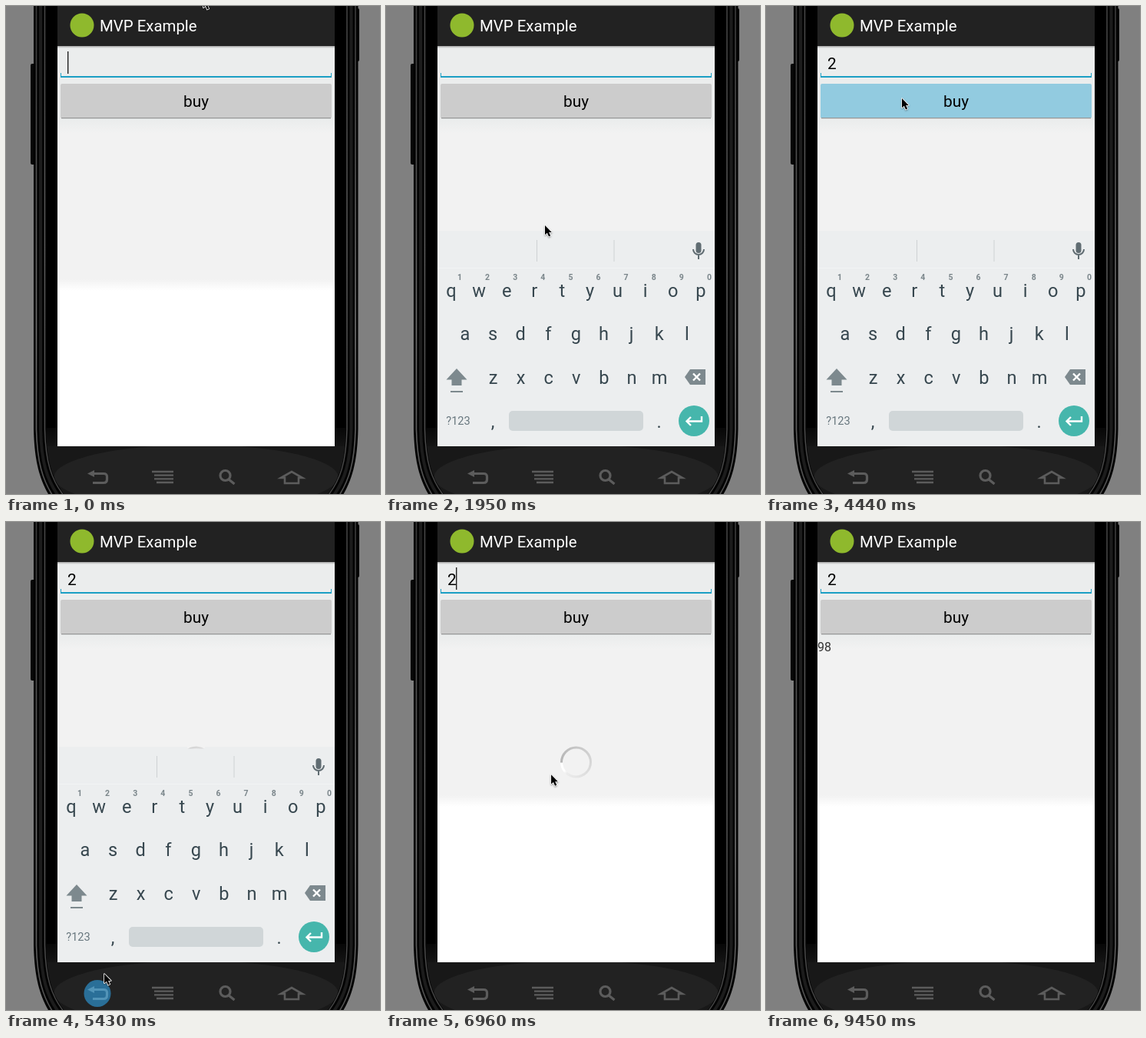
Animation, 487 px wide and 634 px high, one loop 9480 ms. Source, as an HTML page with a canvas:

```html
<!DOCTYPE html>
<html lang="en">
<head>
<meta charset="utf-8">
<title>MVP Example</title>
<style>
html, body { margin: 0; width: 100%; height: 100%; overflow: hidden; background: #808080; }
canvas { display: block; }
</style>
</head>
<body>
<canvas id="stage" width="487" height="634"></canvas>
<script>
const ctx = document.getElementById('stage').getContext('2d');
const LOOP = 9480, TICK = 30;
const TYPED = 3660, BUY = 4350, SPIN = 4470, DONE = 7440;
const INK = '#37474f', ICON = '#7d898e', NAV = '#5c5c5c';
const ARROW = 'M0 0V12.300L2.900 9.700L5 14.600L7.200 13.600L5.100 8.900H8.800Z';

// Pointer tip: time, x, y
const route = [
  [0, 257, -10], [150, 257, -10], [360, 269, 30], [510, 255, 82], [660, 220, 102],
  [870, 200, 82], [1140, 200, 82], [1320, 179, 80], [1500, 179, 80], [1950, 207, 285],
  [2310, 150, 326], [2460, 130, 340], [2640, 118, 342], [3330, 118, 342],
  [3510, 118, 304], [3650, 118, 304], [3900, 150, 190], [4230, 177, 120],
  [4470, 177, 120], [5160, 116, 609], [5280, 116, 609], [5430, 128, 587],
  [5850, 240, 345], [6150, 270, 307], [6270, 262, 310], [6750, 230, 335],
  [7200, 205, 320], [7740, 205, 320], [8190, 80, 166], [8610, 80, 166],
  [8850, 190, 100], [9030, 339, 25], [9180, 335, -22], [LOOP, 335, -22]
];

const clamp = v => Math.max(0, Math.min(1, v));
const ease = v => (v = clamp(v), v * v * (3 - 2 * v));
const within = (t, a, b) => t >= a && t < b;

function pointerAt(t) {
  let i = 0;
  while (i < route.length - 2 && t >= route[i + 1][0]) i++;
  const a = route[i], b = route[i + 1], span = b[0] - a[0], u = (t - a[0]) / span;
  const slope = (k, d) => {
    const p = route[k - 1], q = route[k], r = route[k + 1];
    if (!p || !r || (q[d] - p[d]) * (r[d] - q[d]) <= 0) return 0;
    return (r[d] - p[d]) / (r[0] - p[0]);
  };
  return [1, 2].map(d => {
    const s = ease(u);
    return a[d] + (b[d] - a[d]) * s
      + span * (u * (1 - u) ** 2 * slope(i, d) - u * u * (1 - u) * slope(i + 1, d));
  });
}

function rect(x, y, w, h, fill, r = 0) {
  ctx.fillStyle = fill;
  ctx.beginPath();
  ctx.roundRect(x, y, w, h, r);
  ctx.fill();
}

function disc(x, y, r, fill) {
  ctx.fillStyle = fill;
  ctx.beginPath();
  ctx.arc(x, y, r, 0, 7);
  ctx.fill();
}

function text(s, x, y, size, fill, align = 'center', weight = 400) {
  ctx.font = `${weight} ${size}px Roboto, sans-serif`;
  ctx.textAlign = align;
  ctx.fillStyle = fill;
  ctx.fillText(s, x, y);
}

function fade(y0, y1, ...colors) {
  const g = ctx.createLinearGradient(0, y0, 0, y1);
  colors.forEach((c, i) => g.addColorStop(i / (colors.length - 1), c));
  return g;
}

function shape(d, fill, stroke, width = 2) {
  const p = new Path2D(d);
  if (fill) { ctx.fillStyle = fill; ctx.fill(p); }
  if (stroke) { ctx.strokeStyle = stroke; ctx.lineWidth = width; ctx.stroke(p); }
}

function icon(x, y, ...args) {
  ctx.save();
  ctx.translate(x, y);
  shape(...args);
  ctx.restore();
}

function shell(inset) {
  const l = 36 + inset, r = 458.5 - inset, k = inset * 0.4;
  return `M${l} -5V550C${l + 1} 590 ${l + 7} 617 ${l + 24 + k} 642`
    + `H${r - 24 - k}C${r - 7} 617 ${r - 1} 590 ${r} 550V-5Z`;
}

function phone(t) {
  rect(0, 0, 487, 634, '#808080');
  rect(32, 75, 7, 131, '#070707', 2);
  rect(455, 3, 5, 69, '#070707', 2);
  shape(shell(0), '#030303');
  shape(shell(3.5), null, fade(0, 634, '#3a3a3a', '#505050', '#707070', '#505050'), 1.6);
  shape(shell(9), null, '#1c1c1c', 4);
  shape(shell(14.5), null, fade(0, 634, '#484848', '#606060', '#484848'), 1.4);
  ctx.save();
  ctx.clip(new Path2D(shell(16)));
  rect(50, 0, 396, 548, '#000');
  rect(50, 548, 396, 24, fade(548, 572, '#070707', '#141414'));
  rect(50, 572, 396, 62, '#181818');
  ctx.fillStyle = '#222';
  ctx.beginPath();
  ctx.ellipse(247.5, 612, 185, 42, 0, 0, 7);
  ctx.fill();
  ctx.restore();

  const pressed = within(t, 5220, 5460);
  if (pressed) disc(119, 612.5, 17.5, '#2a6f98');
  const back = pressed ? '#5294b8' : NAV;
  icon(118, 612, 'M-5 -4.500H9Q13.500 -4.500 13.500 -0.500V3Q13.500 7.500 9 7.500H-5', null, back, 3.2);
  icon(118, 612, 'M-12 -4.500L-3 -9V0Z', back);
  icon(204, 612, 'M-14 -7H14M-11 -2.300H14M-11 2.300H14M-8 7H14', null, NAV, 2.3);
  icon(286.5, 612, 'M5.500 -2A6.500 6.500 0 1 1 -7.500 -2A6.500 6.500 0 1 1 5.500 -2M3.500 3L11 9', null, NAV, 3.2);
  icon(372, 612, 'M-14 1L0 -7L14 1H9V8H-9V1Z', null, NAV, 2.6);
}

function spinner(t) {
  const g = ctx.createConicGradient(-1.1 + (t - 6150) / 1200 * Math.PI * 2, 247.5, 312);
  g.addColorStop(0, '#b4b4b4');
  g.addColorStop(0.3, '#cacaca');
  g.addColorStop(0.86, '#ececec');
  g.addColorStop(0.9, '#fff');
  g.addColorStop(0.99, '#fff');
  g.addColorStop(1, '#b4b4b4');
  ctx.strokeStyle = g;
  ctx.lineWidth = 3;
  ctx.beginPath();
  ctx.arc(247.5, 312, 19, 0, 7);
  ctx.stroke();
}

function app(t) {
  rect(67, 0, 361, 572, '#fff');
  rect(67, 52, 361, 98, '#ebeded');
  rect(67, 150, 361, 15, fade(150, 165, '#ebeded', '#f2f2f2'));
  rect(67, 165, 361, 190, '#f2f2f2');
  rect(67, 355, 361, 15, fade(355, 370, '#f2f2f2', '#fff'));
  rect(67, 0, 361, 52, '#222');
  rect(67, 52, 361, 3, fade(52, 55, '#a8a8a8', '#ebeded'));
  disc(99, 25, 15.5, '#8fb92d');
  text('MVP Example', 122, 33, 20.4, '#fff', 'left');

  rect(71, 91, 353, 2, '#1b9fc4');
  rect(71, 87, 1, 5, '#1b9fc4');
  rect(423, 87, 1, 5, '#1b9fc4');
  const typed = t >= TYPED;
  if (typed) text('2', 80, 82, 20.8, '#000', 'left');
  const caretOn = typed ? Math.floor((9449 - t) / 525) % 2 === 0 && t < 9449
                        : Math.floor(t / 520) % 2 === 0;
  if (caretOn) rect(typed ? 91 : 80, 59, 1.4, 29, '#222');

  rect(71, 101, 353, 45, within(t, BUY, SPIN) ? '#92cbe0' : '#ccc', 2);
  rect(72, 145, 351, 1.3, '#969696');
  text('buy', 247.5, 131, 20.8, '#000');

  if (within(t, SPIN, DONE)) spinner(t);
  if (t >= DONE) text('98', 67, 168, 16, '#333', 'left');
}

function keyRow(keys, x, y) {
  [...keys].forEach((k, i) => text(k, x + i * 36.1, y, 23.6, INK));
}

function keyboard(t) {
  const shown = ease((t - 1560) / 210) * (1 - ease((t - 5460) / 180));
  if (!shown) return;
  ctx.save();
  ctx.beginPath();
  ctx.rect(67, 250, 361, 322);
  ctx.clip();
  ctx.globalAlpha = shown;
  ctx.translate(0, (1 - shown) * 56);
  // A sliver of the spinner stays visible above the strip
  const top = within(t, SPIN, 5460) ? 294.5 : 292;
  rect(67, 292, 169, 280, '#eceeef');
  rect(259, 292, 169, 280, '#eceeef');
  rect(236, top, 23, 572 - top, '#eceeef');
  rect(67, 340, 361, 1, '#f2f4f4');
  rect(196, 304, 1, 28, '#cdd1d3');
  rect(296.5, 304, 1, 28, '#cdd1d3');

  if (within(t, 2880, 3150)) rect(104, 342, 36, 57, '#d3d8da', 2);
  keyRow('qwertyuiop', 85, 378);
  [...'1234567890'].forEach((n, i) => text(n, 96 + i * 36.1, 356, 10.5, '#7b868b', 'center', 700));
  keyRow('asdfghjkl', 103, 434);
  keyRow('zxcvbnm', 139.5, 491);
  text('?123', 94, 544, 14.6, '#68777e');
  text(',', 139, 548, 23.6, INK);
  text('.', 355.5, 548, 23.6, INK);
  rect(160, 526, 175, 26, '#d0d6d8', 5);

  icon(92, 483, 'M0 -12L13.500 2.500H6.500V10H-6.500V2.500H-13.500Z', ICON);
  rect(84, 500, 16, 2, ICON);
  icon(403, 482, 'M-14 0L-7 -10H13V10H-7Z', ICON);
  icon(404, 482, 'M-4 -4.500L5 4.500M5 -4.500L-4 4.500', null, '#fff', 2.4);
  disc(401, 539, 20, '#46b6ac');
  icon(401, 539, 'M10 -6V0.500H-9M-4 -5L-9.500 0.500L-4 6', null, '#fff', 2.4);
  rect(403.5, 307, 7, 14, '#606c72', 3.5);
  icon(407, 316, 'M-7 0A7 7 0 0 0 7 0M0 7V13', null, '#606c72', 2);
  ctx.restore();
}

function popup(t) {
  if (!within(t, 2880, TYPED)) return;
  const more = t >= 3150;
  ctx.save();
  ctx.shadowColor = 'rgba(0,0,0,.45)';
  ctx.shadowBlur = 3;
  ctx.shadowOffsetY = 1.5;
  rect(94, 267, 54.5, 64, more ? '#b6bec2' : '#eceff0', 2);
  ctx.restore();
  text(more ? '2' : 'w', 121.2, 311, 34, INK);
}

function pointer(t) {
  const [x, y] = pointerAt(t);
  ctx.save();
  ctx.shadowColor = 'rgba(0,0,0,.3)';
  ctx.shadowBlur = 2;
  ctx.shadowOffsetY = 1;
  ctx.lineJoin = 'round';
  icon(x, y, ARROW, '#000', '#fff', 1.6);
  ctx.shadowColor = 'transparent';
  icon(x, y, ARROW, '#000');
  ctx.restore();
}

function draw(now) {
  const t = Math.floor(now % LOOP / TICK) * TICK;
  phone(t);
  app(t);
  keyboard(t);
  popup(t);
  pointer(t);
  requestAnimationFrame(() => draw(performance.now() - start));
}

const start = performance.now();
draw(0);
</script>
</body>
</html>
```
